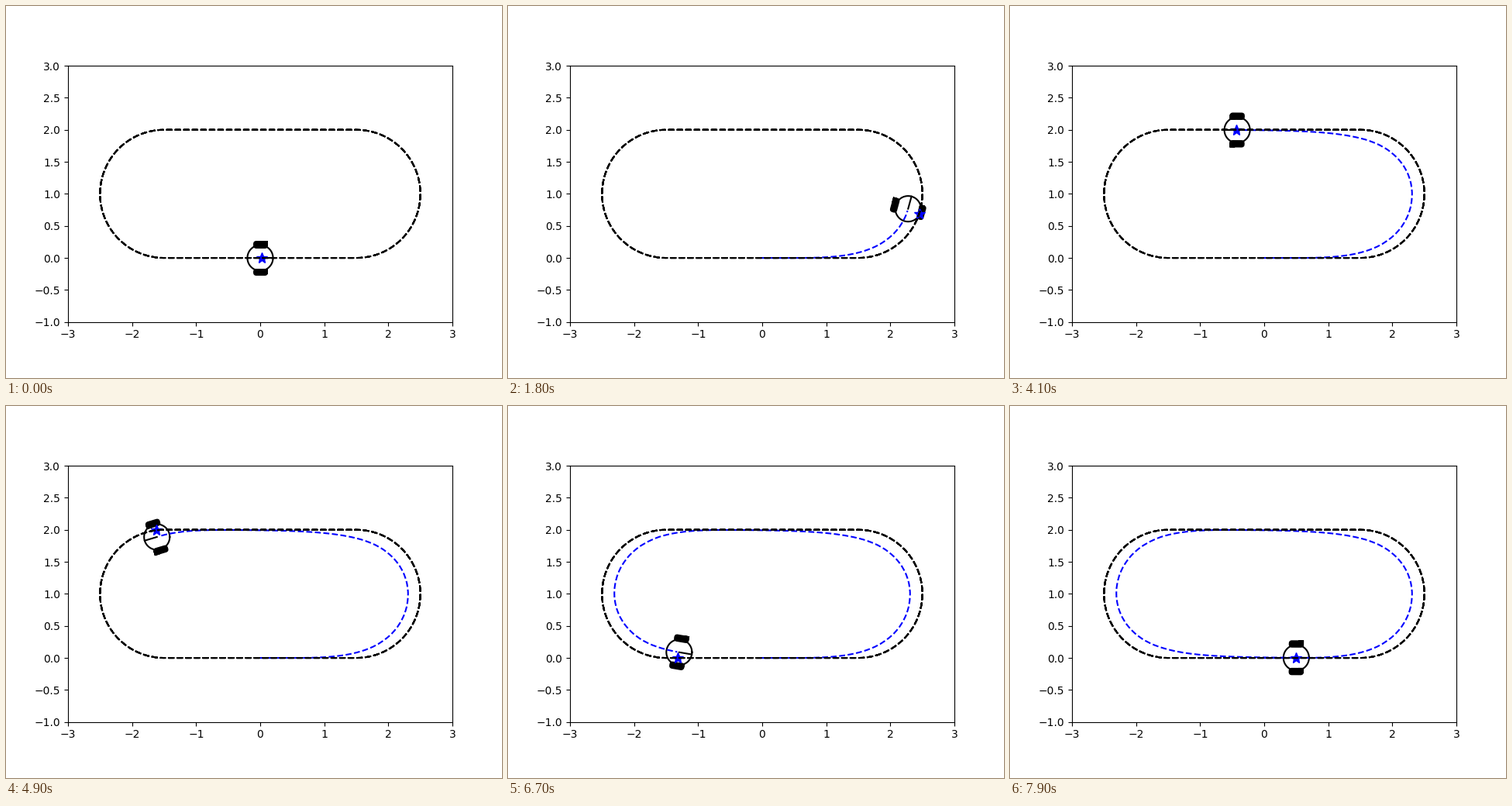
These frames come from a looping animation (640 px wide and 480 px high, 8000 ms). A matplotlib script:

```python
import numpy as np
import matplotlib.pyplot as plt
from matplotlib.animation import FuncAnimation

FRAMES, INTERVAL = 80, 100
SUBSTEPS = 5           # simulation steps per drawn frame
STEP = 0.03            # distance per simulation step at full speed
RAMP = 3               # simulation steps to get up to speed
HORIZON = 21           # track points the planner looks ahead
CAR, WHEEL = 0.2, np.array([0.075, 0.015])


def arc(cx, cy, r, start=0.0, end=2 * np.pi, n=50):
    a = np.linspace(start, end, n + 1)
    return np.column_stack((cx + r * np.cos(a), cy + r * np.sin(a)))


def make_track():
    x = np.linspace(-1.5, 1.5, 51, endpoint=False)[1:]
    bottom = np.column_stack((x, np.zeros_like(x)))
    top = np.column_stack((x[::-1], np.full_like(x, 2.0)))
    right = arc(1.5, 1, 1, -np.pi / 2, np.pi / 2)
    left = arc(-1.5, 1, 1, np.pi / 2, 3 * np.pi / 2)
    return np.concatenate((bottom, right, top, left))


def plan(pos, goals, dirs):
    """Headings of a constant-speed path that best follows the goals."""
    for _ in range(12):
        gap = goals - (pos + STEP * np.cumsum(dirs, axis=0))
        pull = np.cumsum(gap[::-1], axis=0)[::-1]
        pull /= np.linalg.norm(pull, axis=1, keepdims=True)
        dirs = dirs + pull
        dirs /= np.linalg.norm(dirs, axis=1, keepdims=True)
    return dirs


def simulate(track, steps):
    pos, heading = np.array([1e-6, 0.0]), 0.0
    dirs = np.tile([1.0, 0.0], (HORIZON, 1))
    ahead = np.arange(1, HORIZON + 1)
    path, angles, nearest = [], [], []
    for n in range(steps):
        i = np.argmin(np.sum((track - pos) ** 2, axis=1))
        path.append(pos)
        angles.append(heading)
        nearest.append(i)
        dirs = plan(pos, track[(i + ahead) % len(track)], dirs)
        heading = np.arctan2(dirs[0, 1], dirs[0, 0])
        pos = pos + STEP * (1 - np.exp(-n / RAMP)) * dirs[0]
    return np.array(path), angles, nearest


def wheel(center, angle):
    c, s = np.cos(angle), np.sin(angle)
    corners = np.array([[1, 1], [-1, 1], [-1, -1], [1, -1], [1, 1]]) * WHEEL
    return center + corners @ np.array([[c, s], [-s, c]])


track = make_track()
path, angles, nearest = simulate(track, FRAMES * SUBSTEPS)

fig, ax = plt.subplots(figsize=(6.4, 4.8), dpi=100)
ax.set_aspect("equal")
ax.set_xlim(-3, 3)
ax.set_ylim(-1, 3)

body, = ax.plot([], [], c="k")
pointer, = ax.plot([], [], c="k")
wheels = [ax.plot([], [], c="k", linewidth=5)[0] for _ in range(2)]
goal, = ax.plot([], [], c="b", marker="*", markersize=10)
trail, = ax.plot([], [], c="b", linestyle="dashed")
ax.plot(*np.tile(track, (3, 1)).T, c="k", linestyle="dashed")


def update(frame):
    i = frame * SUBSTEPS
    pos, angle = path[i], angles[i]
    front = np.array([np.cos(angle), np.sin(angle)])
    side = np.array([-front[1], front[0]]) * (CAR + WHEEL[1])
    body.set_data(*arc(*pos, CAR, n=100).T)
    pointer.set_data(*np.array([pos, pos + CAR * front]).T)
    for line, sign in zip(wheels, (1, -1)):
        line.set_data(*wheel(pos + sign * side, angle).T)
    goal.set_data(*track[nearest[i]][:, None])
    trail.set_data(*path[:i].T)
    return [body, pointer, *wheels, goal, trail]


anim = FuncAnimation(fig, update, frames=FRAMES, interval=INTERVAL,
                     repeat=True, repeat_delay=0, blit=False)
plt.show()
```
